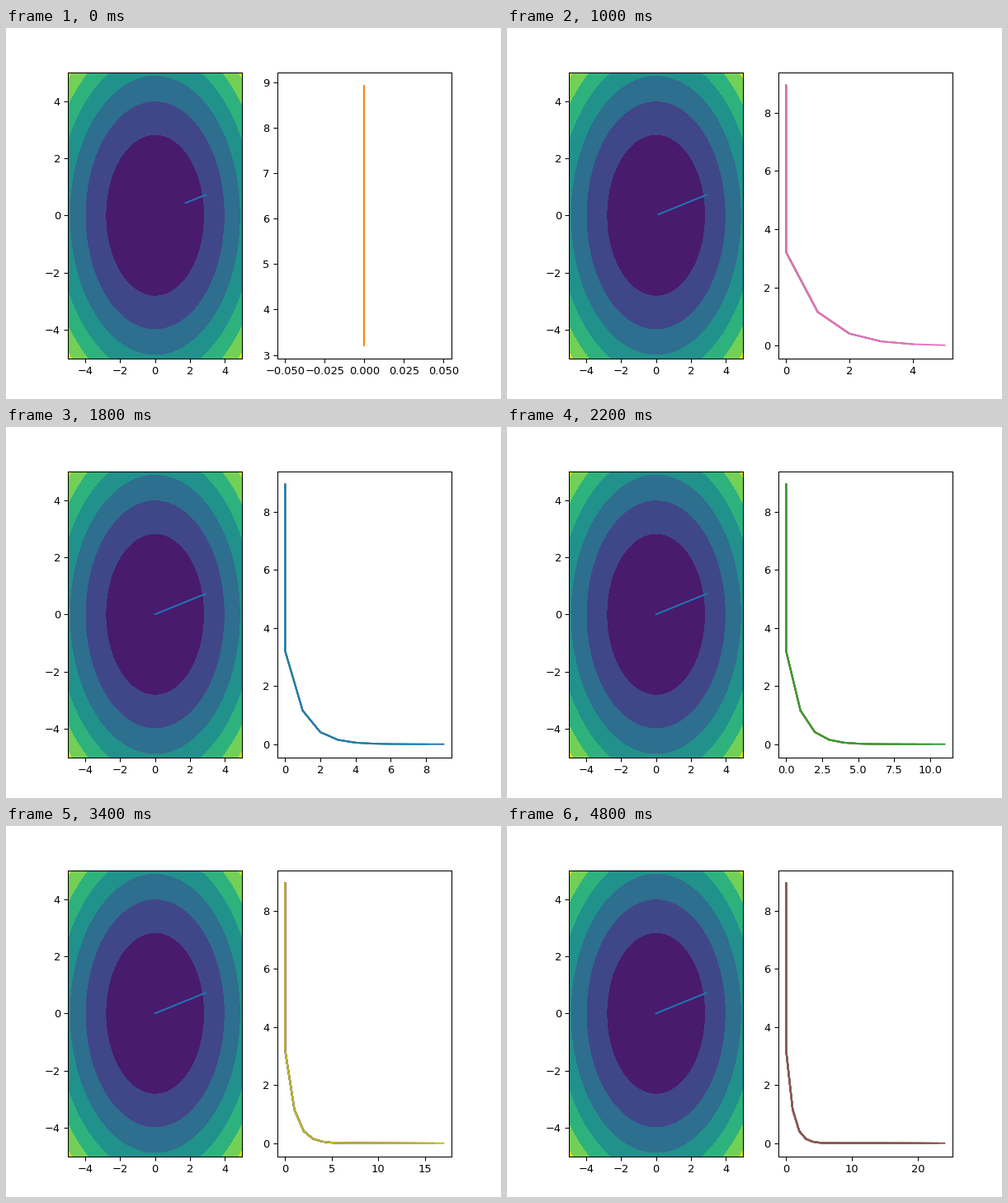
Write a matplotlib script that moves like this. It is 600x450 px and loops after 5000 ms.

```python
import numpy as np
import matplotlib.pyplot as plt
from matplotlib.animation import FuncAnimation

FRAMES = 25
INTERVAL = 200
RATE = 0.2
START = np.array([2.9, 0.72])

# Gradient descent on x^2 + y^2 shrinks the point by (1 - 2 * RATE) each step.
steps = np.arange(FRAMES + 1)
path = START * (1 - 2 * RATE) ** steps[:, None]
loss = (path ** 2).sum(axis=1)
epochs = np.maximum(steps - 1, 0)

fig, (surface_ax, loss_ax) = plt.subplots(1, 2, figsize=(6.4, 4.8), dpi=93.75)

axis = np.linspace(-5, 5, 100)
X, Y = np.meshgrid(axis, axis)
surface_ax.contourf(X, Y, X ** 2 + Y ** 2, levels=np.arange(0, 57, 8))
trail, = surface_ax.plot([], [], color="C0", lw=1.5)
surface_ax.set(xlim=(-5, 5), ylim=(-5, 5))


def update(frame):
    trail.set_data(*path[:frame + 2].T)
    loss_ax.clear()
    # Every step lays a fresh curve over the earlier ones.
    for i in range(frame + 1):
        loss_ax.plot(epochs[:i + 2], loss[:i + 2], color=f"C{(i + 1) % 10}", lw=1.5)
    return trail,


def reset():
    return update(0)


anim = FuncAnimation(fig, update, frames=FRAMES, init_func=reset,
                     interval=INTERVAL, repeat=True, repeat_delay=0, blit=False)
plt.show()
```
